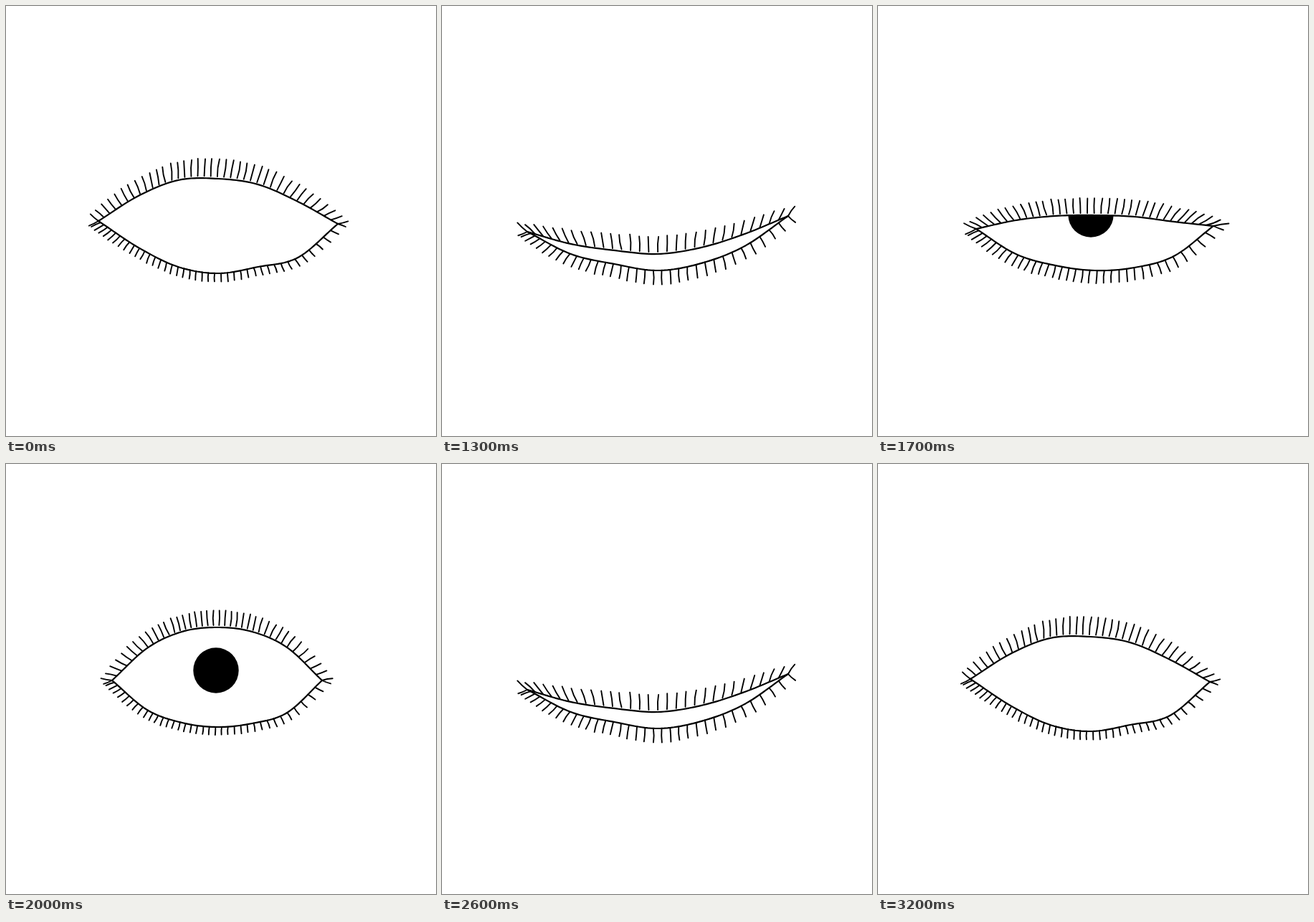
Animation, 600 px wide and 600 px high, one loop 3300 ms. Source, as an HTML page with a canvas:

```html
<!DOCTYPE html>
<html lang="en">
<head>
<meta charset="utf-8">
<title>Blinking eye</title>
<style>
html, body { margin: 0; width: 100%; height: 100%; overflow: hidden; background: #fff; }
canvas { display: block; width: 100vw; height: 100vh; }
</style>
</head>
<body>
<canvas id="stage" width="600" height="600"></canvas>
<script>
const ctx = document.getElementById('stage').getContext('2d');
const LOOP = 3300;

// corners: left x, y, right x, y
// lid: heights at even steps between the corners
// lashes: how many, then angle in degrees and length at the left, middle and right
const wide = {
  corners: [129, 300, 463, 304],
  up: { lid: [265, 243, 241, 249, 273], count: 37, angle: [-52, 6, 76], length: [15, 25, 15] },
  low: { lid: [337, 364, 373, 364, 351], count: 41, angle: [-66, 2, 70], length: [15, 12, 12] }
};

const lowered = {
  corners: [130, 311, 472, 299],
  up: { lid: [282, 267, 266, 272, 285], count: 35, angle: [-72, 0, 74], length: [20, 22, 21] },
  low: { lid: [348, 370, 376, 368, 347], count: 41, angle: [-66, -2, 62], length: [18, 17, 14] }
};

const squint = {
  corners: [119, 315, 483, 293],
  up: { lid: [332, 341, 346, 337, 318], count: 29, angle: [-50, 0, 32], length: [19, 22, 17] },
  low: { lid: [346, 360, 369, 359, 335], count: 34, angle: [-70, 0, 48], length: [14, 20, 14] }
};

const shut = { ...squint, up: { ...squint.up, lid: squint.low.lid } };

const half = {
  corners: [137, 311, 468, 307],
  up: { lid: [299, 293, 292, 294, 301], count: 35, angle: [-68, 2, 78], length: [19, 21, 22] },
  low: { lid: [346, 362, 369, 365, 349], count: 36, angle: [-66, -6, 66], length: [17, 18, 15] },
  pupil: [297, 291]
};

const awake = {
  corners: [148, 302, 441, 302],
  up: { lid: [257, 234, 228, 234, 256], count: 38, angle: [-82, 0, 78], length: [16, 21, 15] },
  low: { lid: [343, 361, 367, 362, 347], count: 37, angle: [-70, -3, 70], length: [13, 11, 13] },
  pupil: [293, 288]
};

// Blends numbers, lists and whole poses alike
function mix(a, b, k) {
  if (a === undefined) return b;
  if (typeof a === 'number') return a + (b - a) * k;
  if (Array.isArray(a)) return a.map((v, i) => mix(v, b[i], k));
  return Object.fromEntries(Object.keys(b).map(key => [key, mix(a[key], b[key], k)]));
}

const drawings = [
  wide, lowered, mix(lowered, squint, 1 / 3), mix(lowered, squint, 2 / 3), squint, shut, squint,
  mix(squint, half, 0.5), half, mix(half, awake, 1 / 3), mix(half, awake, 2 / 3), awake
];

function random(seed) {
  const v = Math.sin(seed * 12.9898) * 43758.5453;
  return v - Math.floor(v);
}

// Point at u (0 to 1) on a smooth curve through the corners and the lid heights
function lidPoint([x0, y0, x1, y1], lid, u) {
  const ys = [y0, ...lid, y1], last = ys.length - 1;
  const i = Math.min(last - 1, Math.floor(u * last)), s = u * last - i;
  const b = ys[i], c = ys[i + 1];
  const a = i ? ys[i - 1] : 2 * b - c;
  const d = i + 2 <= last ? ys[i + 2] : 2 * c - b;
  const y = b + s / 2 * (c - a + s * (2 * a - 5 * b + 4 * c - d + s * (3 * (b - c) + d - a)));
  return [mix(x0, x1, u), y];
}

// Value from [left, middle, right], changing fastest near the corners
function spread([left, middle, right], u) {
  const s = Math.abs(2 * u - 1);
  return mix(middle, u < 0.5 ? left : right, (s + s ** 3) / 2);
}

function trace(points) {
  ctx.beginPath();
  points.forEach(([x, y]) => ctx.lineTo(x, y));
}

function drawLashes(corners, side, dir) {
  const n = Math.round(side.count);
  const crowding = dir < 0 ? 1.05 : 1.25;
  ctx.lineWidth = 1.9;
  ctx.beginPath();
  for (let i = 0; i <= n; i++) {
    const u = (i / n) ** crowding;
    let [x, y] = lidPoint(corners, side.lid, u);
    if (dir < 0) y -= 3 * Math.sin(Math.PI * u);
    const angle = (spread(side.angle, u) + 6 * random(i + 1) - 3) * Math.PI / 180;
    const length = spread(side.length, u) * (0.95 + 0.1 * random(i + 50));
    const dx = length * Math.sin(angle), dy = dir * length * Math.cos(angle);
    const bow = 0.16 * random(i + 90) - 0.08;
    ctx.moveTo(x, y);
    ctx.quadraticCurveTo(x + dx / 2 + dy * bow, y + dy / 2 - dx * bow, x + dx, y + dy);
  }
  ctx.stroke();
}

function draw({ corners, up, low, pupil }) {
  const [top, bottom] = [up, low].map(side =>
    Array.from({ length: 81 }, (_, i) => lidPoint(corners, side.lid, i / 80)));
  ctx.fillStyle = '#fff';
  ctx.fillRect(0, 0, 600, 600);
  ctx.fillStyle = ctx.strokeStyle = '#000';
  ctx.lineCap = ctx.lineJoin = 'round';

  if (pupil) {
    ctx.save();
    trace([...top, ...bottom.slice().reverse()]);
    ctx.clip();
    ctx.beginPath();
    ctx.arc(...pupil, 31.7, 0, Math.PI * 2);
    ctx.fill();
    ctx.restore();
  }

  ctx.lineWidth = 2.2;
  for (const lid of [top, bottom]) {
    trace(lid);
    ctx.stroke();
  }
  drawLashes(corners, up, -1);
  drawLashes(corners, low, 1);
}

// Hold, ten drawings a second until awake, hold, then the same way back
function stepAt(t) {
  if (t < 1000) return 0;
  if (t < 2200) return Math.min(11, Math.floor(t / 100) - 9);
  return Math.max(0, 32 - Math.floor(t / 100));
}

const start = performance.now();
let shown = -1;

function tick(now) {
  const step = stepAt(Math.max(0, now - start) % LOOP);
  if (step !== shown) draw(drawings[shown = step]);
  requestAnimationFrame(tick);
}
tick(start);
</script>
</body>
</html>
```
